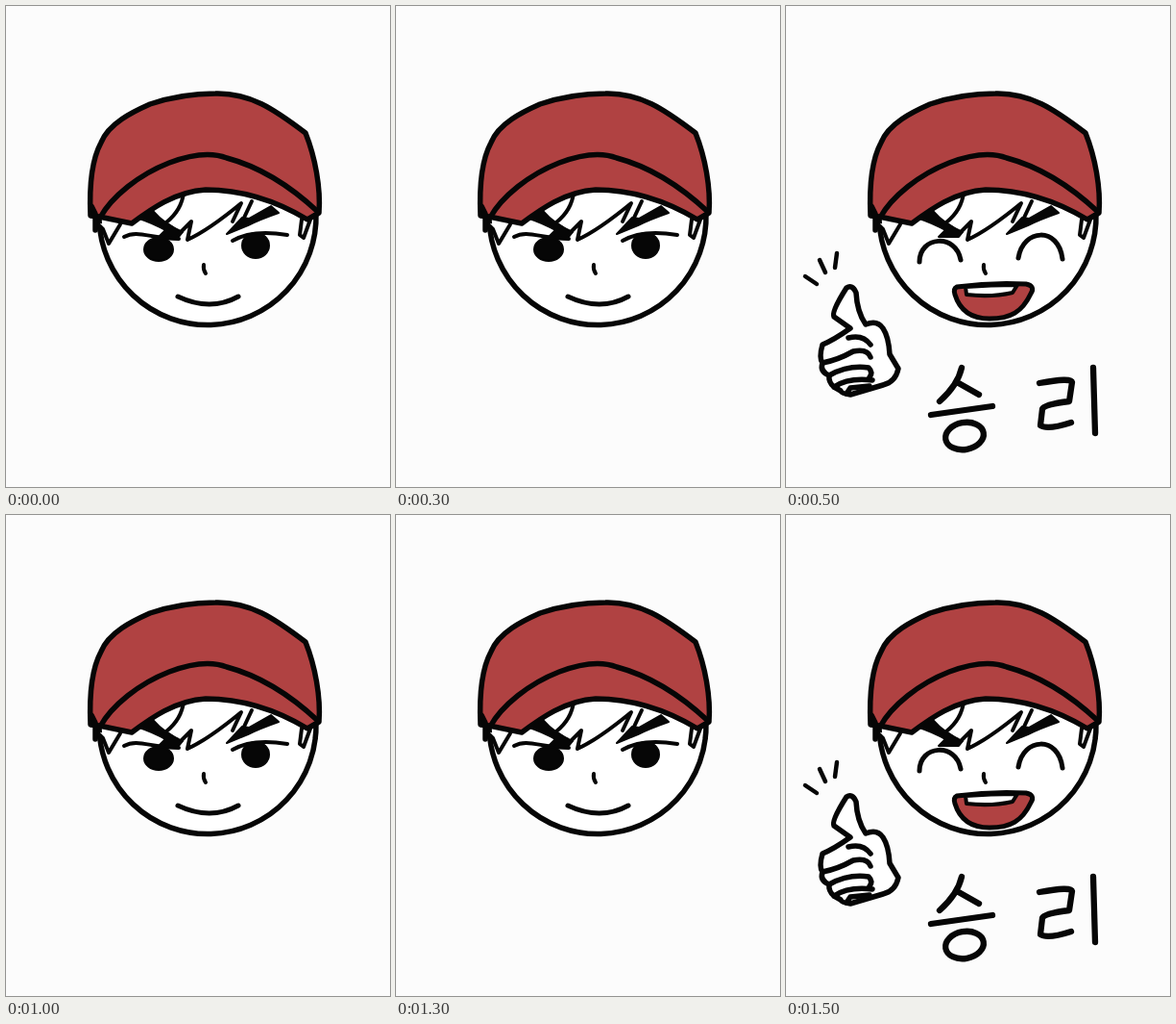
An HTML page for the animation above (2 s loop, 400x500 px).

```html
<!DOCTYPE html>
<html lang="ko">
<head>
<meta charset="utf-8">
<title>승리</title>
<style>
  html, body { margin: 0; width: 100%; height: 100%; overflow: hidden; background: #fcfcfc; }
  svg { display: block; width: 400px; height: 500px; }
  path, ellipse { fill: none; stroke: #060606; stroke-width: 5.5; stroke-linecap: round; stroke-linejoin: round; }
  .red { fill: #b04242; }
  .white { fill: #fff; }
  .ink { fill: #060606; stroke-width: 2; }
  .thin path, .thin { stroke-width: 4; }
  .lettering path, .lettering ellipse { stroke-width: 6.3; }
</style>
</head>
<body>
<svg viewBox="0 0 400 500">
  <g id="head">
    <path class="white" d="M97 222A113 113 0 1 0 323 215L208 170"/>
    <g class="thin">
      <path class="white" d="M95 226L101 232L107 247L119 227"/>
      <path class="white" d="M308 222L306 238L310 241L317 222"/>
      <path d="M185 194Q183 212 167 225M166 226L181 236L193 224L189 243Q211 233 245 205L236 224M256 203L248 220"/>
    </g>
    <path class="ink" d="M136 220L153 213Q165 227 184 235L180 240L159 240L166 233Q154 226 136 220Z"/>
    <path class="ink" d="M230 237L246 220L253 221L276 208L284 215Q264 222 252 228Z"/>
    <path class="red" d="M97 219L88 218C87 195 87 164 99 142C107 122 132 110 150 102C171 95 196 91 218 91C254 90 279 107 312 132C322 157 328 189 326 215L314 222C284 204 248 191 208 191C176 193 151 211 131 226Z"/>
    <path d="M98 220C110 198 139 175 170 163Q207 149 230 158C264 167 296 187 325 214M89 208L93 216L93 233"/>
    <path class="thin" d="M206 269Q205 274 208 278"/>
  </g>

  <g id="calm">
    <path class="thin" d="M123 240C137 232 151 242 180 242"/>
    <path class="thin" d="M236 244C253 234 275 235 293 238"/>
    <ellipse class="ink" cx="159" cy="253" rx="15" ry="12"/>
    <ellipse class="ink" cx="260" cy="249" rx="14" ry="13"/>
    <path d="M179 302Q213 318 242 302" style="stroke-width:5"/>
  </g>

  <g id="cheer">
    <path d="M139 266C139 239 177 236 182 264M242 262C247 231 284 229 288 263" style="stroke-width:5"/>
    <path class="red" d="M178 292Q214 287 250 289Q260 291 255 299C246 318 234 325 212 325C190 325 180 313 176 300Q174 294 178 292Z" style="stroke-width:5"/>
    <path class="white thin" d="M187 292L188 300Q214 303 236 298L241 290Q213 290 187 292Z"/>
    <path d="M20 281L32 289M35 264L41 277M53 257L51 272" style="stroke-width:4.5"/>
    <path class="white" d="M67 335L50 323Q47 318 63 293Q69 289 73 298Q74 318 83 331Q95 326 101 335Q107 344 108 362L117 377Q114 391 101 394L67 404Q58 403 57 400L50 396Q44 391 45 384Q35 380 38 371Q34 366 38 352Q50 347 67 335Z"/>
    <path d="M65 345Q80 341 88 352M38 371Q54 368 70 359Q85 356 88 365M45 384Q65 373 86 376Q91 381 87 386M50 396Q65 386 90 389M63 403L67 397L87 395"/>
    <g class="lettering" role="img" aria-label="승리">
      <path d="M183 376Q179 394 160 411M178 391L201 404M151 425L215 416"/>
      <ellipse cx="186" cy="447" rx="20" ry="14" transform="rotate(-10 186 447)"/>
      <path d="M264 392Q297 386 298 391L295 411Q269 414 267 419L265 436Q272 441 297 433M320 376L322 444"/>
    </g>
  </g>
</svg>
<script>
  const calm = document.getElementById('calm');
  const cheer = document.getElementById('cheer');

  function draw() {
    const cheering = performance.now() % 1000 >= 500;
    calm.style.display = cheering ? 'none' : '';
    cheer.style.display = cheering ? '' : 'none';
    requestAnimationFrame(draw);
  }
  draw();
</script>
</body>
</html>
```
